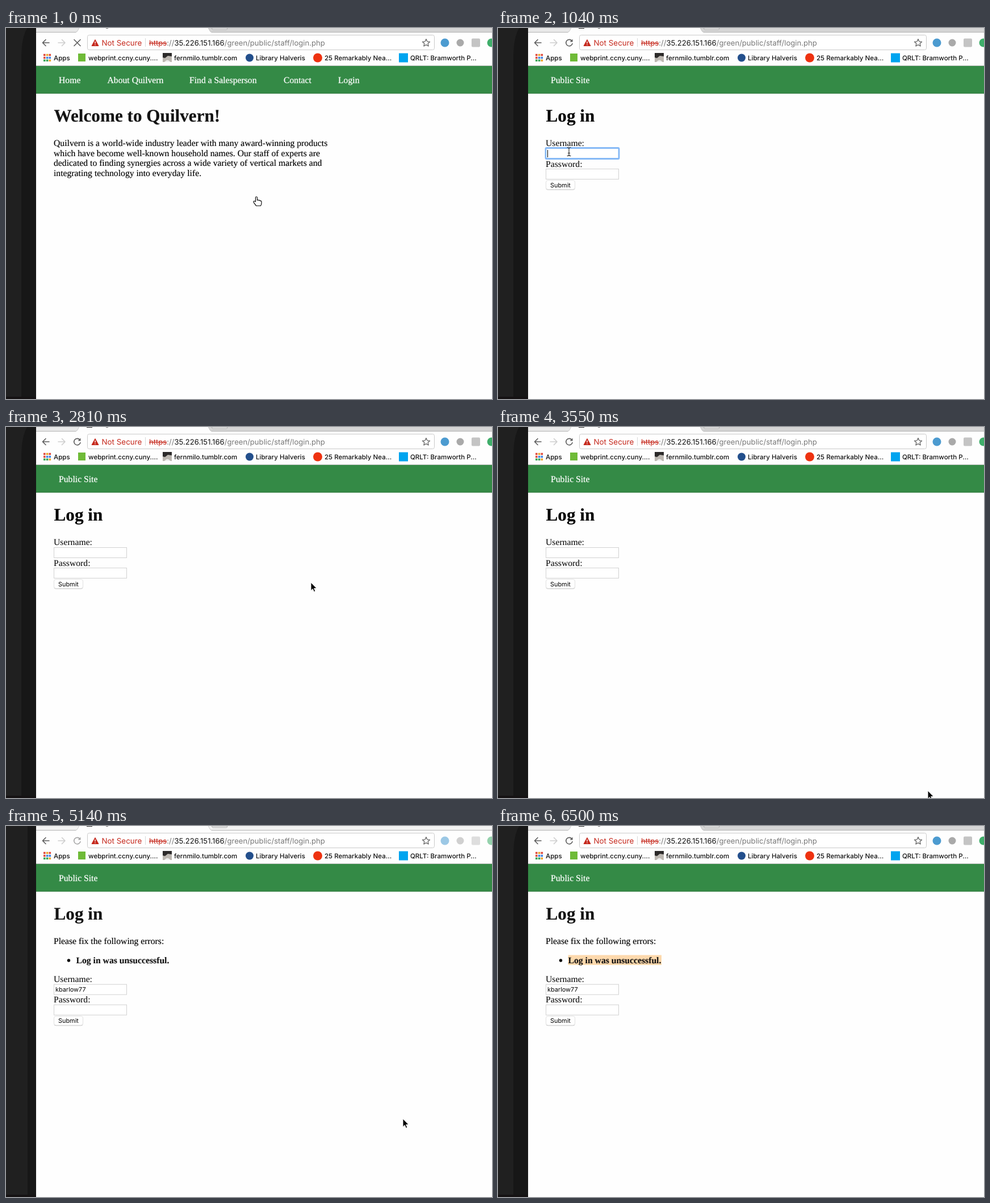
An HTML page that plays this animation: 856x654 px, repeating every 8000 ms.

```html
<!DOCTYPE html>
<html lang="en">
<head>
<meta charset="utf-8">
<title>Log in</title>
<style>
  html, body { margin: 0; width: 100%; height: 100%; overflow: hidden; background: #fefefe; }
  svg { display: block; width: 856px; height: 654px; }
  text { text-rendering: geometricPrecision; white-space: pre; }
  .ui { font-family: Inter, Roboto, sans-serif; stroke: none; }
  .url { font-size: 13.1px; fill: #777; }
  .warn { font-size: 13.4px; fill: #c5281c; }
  .marks { font-size: 11.55px; font-weight: 500; fill: #111; }
  .field { font-size: 10.9px; }
  .menu { font-size: 12.5px; font-weight: 650; }
  .page { font: 15.7px "Liberation Serif", "Times New Roman", serif; }
  .page text { stroke: #000; stroke-width: .15; }
  .page .nav, .page .nav text { fill: #fff; stroke: #fff; stroke-width: .25; }
  .page .ui, .page .ui text { stroke: none; }
  .title { font-size: 31.2px; font-weight: bold; }
  .soft { fill: #141414; }
  .line { fill: none; stroke-linecap: round; stroke-linejoin: round; }
  .box { fill: #fff; stroke: #d2d2d2; }
  .ring { fill: #fff; stroke: #86b9f6; stroke-width: 2.8; }

  /* 8 s loop: 1% = 80 ms */
  .t { animation: 8s step-end infinite; }
  .home { animation-name: home; }
  .loaded { animation-name: loaded; }
  .login { animation-name: login; }
  .error { animation-name: error; }
  .focus { animation-name: focus; }
  .caret { animation-name: caret; }
  .list { animation-name: list; }
  .filled { animation-name: filled; }
  .caret2 { animation-name: caret2; }
  .mark { animation-name: mark; }
  .inactive { animation-name: inactive; }
  .arrow { animation-name: arrow; }
  .beam { animation-name: beam; }
  .pointer { animation-name: move; }

  @keyframes home { 0% { opacity: 1 } 1.875%, to { opacity: 0 } }
  @keyframes loaded { 0% { opacity: 0 } 1.875%, to { opacity: 1 } }
  @keyframes login { 0% { opacity: 0 } 1.875% { opacity: 1 } 55.125%, to { opacity: 0 } }
  @keyframes error { 0% { opacity: 0 } 55.125%, to { opacity: 1 } }
  @keyframes focus { 0% { opacity: 0 } 11.125% { opacity: 1 } 33.25%, to { opacity: 0 } }
  @keyframes caret { 0% { opacity: 0 } 11.125% { opacity: 1 } 18.5% { opacity: 0 } 24% { opacity: 1 } 29.625%, to { opacity: 0 } }
  @keyframes list { 0% { opacity: 0 } 14.875% { opacity: 1 } 33.25%, to { opacity: 0 } }
  @keyframes filled { 0% { opacity: 0 } 47.875%, to { opacity: 1 } }
  @keyframes caret2 { 0% { opacity: 0 } 47.875% { opacity: 1 } 51.625%, to { opacity: 0 } }
  @keyframes mark { 0% { opacity: 0 } 79.5%, to { opacity: 1 } }
  @keyframes inactive { 0% { opacity: 0 } 55.125% { opacity: 1 } 79.5%, to { opacity: 0 } }
  @keyframes arrow { 0% { opacity: 0 } 1.875% { opacity: 1 } 9.27% { opacity: 0 } 29.625%, to { opacity: 1 } }
  @keyframes beam { 0% { opacity: 0 } 9.27% { opacity: 1 } 29.625%, to { opacity: 0 } }
  @keyframes move {
    0% { transform: translate(441px, 298px); animation-timing-function: steps(6) }
    11.125% { transform: translate(125px, 218px) }
    18.5% { transform: translate(126px, 220px) }
    22.25% { transform: translate(127px, 222px) }
    27.75% { transform: translate(127px, 222px); animation-timing-function: steps(4) }
    35.125% { transform: translate(537px, 274px); animation-timing-function: steps(4) }
    42.5% { transform: translate(757px, 639px) }
    44.375% { transform: translate(757px, 641px) }
    47.875% { transform: translate(760px, 660px) }
    55.125% { transform: translate(396px, 425px); animation-timing-function: steps(2) }
    58.75% { transform: translate(409px, 354px) }
    62.5% { transform: translate(560px, 440px) }
    64.25% { transform: translate(699px, 516px) }
    68% { transform: translate(699px, 516px); animation-timing-function: steps(4) }
    75.375%, to { transform: translate(765px, 657px) }
  }
</style>
</head>
<body>
<svg viewBox="0 0 856 654">
  <defs>
    <g id="form">
      <text x="84" y="208">Username:</text>
      <text x="84" y="244.5">Password:</text>
      <rect class="box" x="84.5" y="212.5" width="128" height="18"/>
      <rect class="box" x="84.5" y="248.5" width="128" height="18"/>
      <rect x="84.5" y="269" width="51" height="16.5" rx="3.5" fill="#c4c4c4"/>
      <rect x="84.5" y="268.5" width="51" height="16" rx="3.5" fill="#fff" stroke="#dcdcdc" stroke-width=".8"/>
      <text class="ui field" x="92" y="280.5">Submit</text>
    </g>
  </defs>

  <!-- desktop edge -->
  <rect width="53" height="654" fill="#202020"/>
  <path d="M53 0H37C30 14 27 28 27 56V654H53Z" fill="#171717"/>
  <rect class="t inactive" x="27" width="11" height="654" fill="#202020"/>
  <rect y="650" width="53" height="4" fill="#151213"/>

  <!-- tabs and toolbar -->
  <rect x="53" width="803" height="654" fill="#fefefe"/>
  <rect x="53" width="803" height="7" fill="#d5d5d5"/>
  <path d="M53 0H129L125 7H53Z" fill="#e9e9e9"/>
  <rect class="t inactive" x="53" width="803" height="7" fill="#f2f2f2"/>
  <path d="M53 7.5H123Q126 7 129 0M356 0Q359 7 362 7.5H856" fill="none" stroke="#b2b2b2"/>
  <path d="M129 0H356Q359 7 362 8H123Q126 7 129 0Z" fill="#fdfdfd"/>
  <path d="M362 0L364 3H388Q390 3 390 0Z" fill="#e4e4e4" stroke="#aaa" stroke-width=".8"/>
  <rect x="176" width="4" height="1" fill="#777"/>
  <rect class="t loaded" x="142" width="10" height="1" fill="#222"/>

  <g class="line" stroke="#5c5c5c" stroke-width="1.6">
    <path d="M76 26H65M70 20.5L64.5 26L70 31.5"/>
    <path d="M92 26H103M98.5 20.5L104 26L98.5 31.5" stroke="#cecece"/>
    <path class="t home" d="M120 20.5L131 31.5M131 20.5L120 31.5"/>
    <g class="t loaded">
      <path d="M129.8 22.3A5.7 5.7 0 1 0 131 27.5"/>
      <path d="M131.5 19.5V24.5H126.5Z" fill="#5c5c5c" stroke="none"/>
    </g>
  </g>

  <rect x="143.5" y="12.5" width="611" height="26" rx="3" fill="#fff" stroke="#cacaca"/>
  <path d="M157 20.5L163 31.5H151Z" fill="#c5281c" stroke="#c5281c" stroke-linejoin="round"/>
  <path d="M157 23.8V27.6M157 29V30.3" stroke="#fff" stroke-width="1.4"/>
  <path d="M245.5 18V33" stroke="#d8d8d8"/>
  <text class="ui warn" x="168.5" y="31">Not Secure</text>
  <text class="ui url" x="252" y="31"><tspan fill="#c5281c" text-decoration="line-through">https</tspan>://<tspan fill="#111">35.226.151.166</tspan>/green/public/staff/login.php</text>
  <path class="line" d="M740 19.5L741.9 23.8L746.6 24.3L743.1 27.4L744.1 32L740 29.6L735.9 32L736.9 27.4L733.4 24.3L738.1 23.8Z" stroke="#666" stroke-width="1.3"/>
  <circle cx="773" cy="26" r="7.5" fill="#4c9bd0"/>
  <circle cx="800" cy="26" r="6.5" fill="#a9a9a9"/>
  <rect x="820" y="18.5" width="15" height="15" rx="2" fill="#c4c4c4"/>
  <circle cx="855" cy="26" r="7.5" fill="#3fae6a"/>
  <path class="t inactive" d="M112 14H138V38H112ZM762 14H856V38H762Z" fill="#fff" fill-opacity=".45"/>

  <!-- bookmarks -->
  <g stroke-width="3.6">
    <path d="M66 47.5h3.6M66 52.5h3.6M75.5 47.5h3.6" stroke="#e0473a"/>
    <path d="M70.8 47.5h3.6M75.5 57.3h3.6" stroke="#eda52a"/>
    <path d="M70.8 52.5h3.6M75.5 52.5h3.6" stroke="#3f83e6"/>
    <path d="M66 57.3h3.6M70.8 57.3h3.6" stroke="#39a556"/>
  </g>
  <rect x="127" y="45" width="13" height="14" fill="#6fbb38"/>
  <rect x="276" y="44" width="16" height="16" fill="#bdb8b2"/>
  <path d="M276 44h16v6l-7-1-5 4-4-1Z" fill="#2c2a2a"/>
  <path d="M279 60q5-7 11 0Z" fill="#eee"/>
  <circle cx="429" cy="52.5" r="7" fill="#234f8c"/>
  <circle cx="549" cy="52.5" r="8" fill="#ee3210"/>
  <rect x="692" y="44.5" width="16" height="16" fill="#00a4ef"/>
  <g class="ui marks">
    <text x="84" y="57">Apps</text>
    <text x="145" y="57">webprint.ccny.cuny....</text>
    <text x="296" y="57">fernmilo.tumblr.com</text>
    <text x="440" y="57">Library Halveris</text>
    <text x="561" y="57">25 Remarkably Nea...</text>
    <text x="712" y="57">QRLT: Bramworth P...</text>
  </g>

  <!-- page -->
  <rect x="53" y="67" width="803" height="48.5" fill="#348a46"/>
  <path d="M53 66.5H856" stroke="#b9bdb9"/>
  <path d="M53 115H856" stroke="#2c773c"/>
  <g class="page">
    <g class="t home">
      <g class="nav">
        <text x="93" y="97">Home</text>
        <text x="178.5" y="97">About Quilvern</text>
        <text x="323" y="97">Find a Salesperson</text>
        <text x="489" y="97">Contact</text>
        <text x="585" y="97">Login</text>
      </g>
      <text class="title soft" x="84.5" y="165">Welcome to Quilvern!</text>
      <text x="84" y="208">Quilvern is a world-wide industry leader with many award-winning products</text>
      <text x="84" y="225.7">which have become well-known household names. Our staff of experts are</text>
      <text x="84" y="243.4">dedicated to finding synergies across a wide variety of vertical markets and</text>
      <text x="84" y="261.1">integrating technology into everyday life.</text>
    </g>

    <text class="nav t loaded" x="93" y="97">Public Site</text>

    <g class="t login">
      <text class="title" x="84.5" y="165">Log in</text>
      <use href="#form"/>
      <rect class="ring t focus" x="84" y="211.5" width="129" height="19" rx="1.5"/>
      <path class="t caret" d="M87.5 215V228" stroke="#000"/>
      <g class="t list">
        <rect x="84.5" y="231.5" width="231" height="142" fill="#fff" stroke="#a6c6ec"/>
        <g class="ui menu">
          <text x="93" y="248.5">qsample</text>
          <text x="93" y="272">wfenn000@mail1.example.edu</text>
          <text x="93" y="295.5">wagonemodekkorabu@example.com</text>
          <text x="93" y="319">brielita_47@example.com</text>
          <text x="93" y="342.5">themarlowen</text>
          <text x="93" y="366">dabedabe</text>
        </g>
      </g>
      <g class="t filled">
        <rect x="84.5" y="212.5" width="128" height="18" fill="#fafbc1" stroke="#c9c9b8"/>
        <path d="M84 212.5H213" stroke="#85857c"/>
        <text class="ui field" x="87" y="225.5">kbarlow777</text>
        <rect class="ring" x="84" y="248" width="129" height="19" rx="1.5"/>
      </g>
      <path class="t caret2" d="M87.5 251.5V264.5" stroke="#000"/>
    </g>

    <g class="t error">
      <text class="title soft" x="84.5" y="165">Log in</text>
      <text x="84" y="208">Please fix the following errors:</text>
      <rect class="t mark" x="123.5" y="227.5" width="164.5" height="17.5" fill="#fdd9ad"/>
      <circle cx="110.5" cy="237" r="2.7"/>
      <text class="soft" x="123.5" y="241.5" font-weight="bold">Log in was unsuccessful.</text>
      <use href="#form" y="66.7"/>
      <text class="ui field" x="87" y="292">kbarlow77</text>
    </g>
  </g>

  <!-- mouse pointer -->
  <g class="t pointer">
    <path class="t home" d="M-1.5 8V1Q-1.5-.5 0-.5T1.5 1V5.5Q3.5 4.5 4.2 6Q6 5.2 6.8 6.8Q9 6.3 9 8.5V11Q9 13 7.5 15.5H-.5Q-1.5 13-3.5 11.5L-5 8.5Q-5 6.5-3 7.2Z" fill="#fff" stroke="#111" stroke-width="1.2"/>
    <path class="t arrow" d="M0 0V14.5L3.3 11.4L5.5 16.5L7.9 15.5L5.7 10.5H10.2Z" stroke="#fff"/>
    <path class="t beam line" d="M-3-7.5Q0-7.5 0-5.5Q0-7.5 3-7.5M0-5.5V5.5M-3 7.5Q0 7.5 0 5.5Q0 7.5 3 7.5M-1.5 2.5H1.5" stroke="#222" stroke-width="1.1"/>
  </g>
</svg>
</body>
</html>
```
